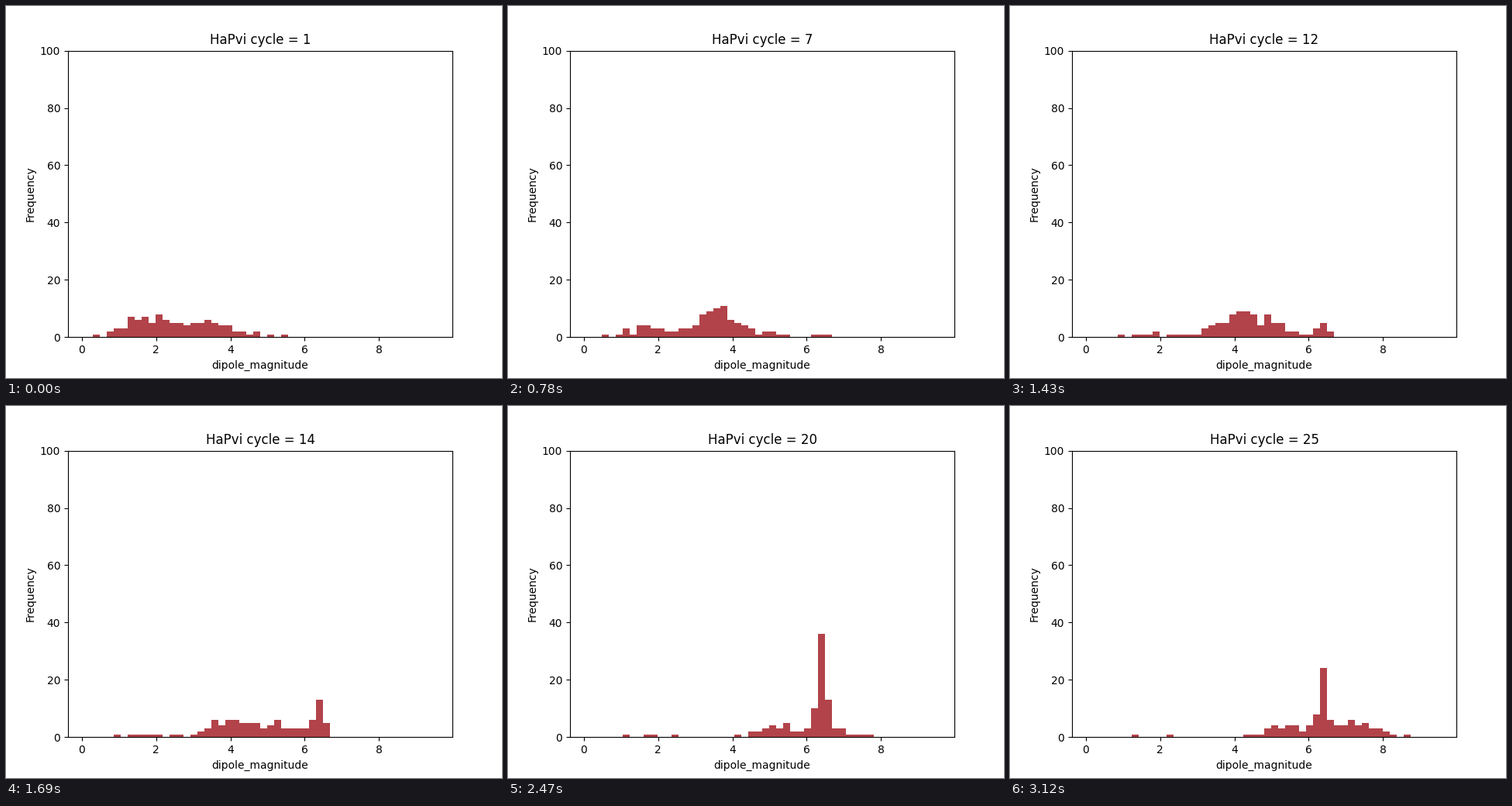
A matplotlib script for the animation above (3.25 s loop, 640x480 px).

```python
import numpy as np
import matplotlib.pyplot as plt
from matplotlib.animation import FuncAnimation

CYCLES = 25
BINS = 50
SAMPLES = 100
LOW, HIGH = 0.095, 9.51
RED = "#b2434a"

plt.rcParams["font.family"] = "DejaVu Sans"
edges = np.linspace(LOW, HIGH, BINS + 1)
centers = (edges[:-1] + edges[1:]) / 2


def glide(cycle, points):
    """Straight-line motion through a few {cycle: value} key points."""
    return np.interp(cycle, list(points), list(points.values()))


def bell(center, width):
    shape = np.exp(-0.5 * ((centers - center) / width) ** 2)
    return shape / shape.sum()


def histogram(cycle):
    """The population leaves a low group, climbs, and gathers in a spike."""
    low = glide(cycle, {1: 56, 4: 50, 9: 12, 16: 6, 25: 2})
    middle = glide(cycle, {1: 38, 4: 38, 9: 70, 12: 36, 16: 35, 20: 24, 25: 28})
    spike = glide(cycle, {4: 0, 9: 5, 12: 11, 16: 26, 20: 50, 25: 28})
    high = SAMPLES - low - middle - spike

    middle_at = glide(cycle, {1: 3.4, 9: 3.7, 16: 4.0, 20: 5.2, 25: 5.4})
    high_at = glide(cycle, {1: 4.6, 12: 4.8, 20: 6.6, 25: 7.2})

    density = (low * bell(1.8, 0.6) + middle * bell(middle_at, 0.5)
               + spike * bell(6.4, 0.12) + high * bell(high_at, 0.6))
    density *= np.random.default_rng(cycle).uniform(0.7, 1.3, BINS)
    running = np.cumsum(density) * SAMPLES / density.sum()
    # rounding the running sum gives whole counts with a fixed total
    return np.diff(np.rint(running), prepend=0)


fig, ax = plt.subplots(figsize=(6.4, 4.8), dpi=100)
bars = ax.bar(edges[:-1], histogram(1), width=np.diff(edges), align="edge",
              color=RED)
margin = 0.05 * (HIGH - LOW)
ax.set_xlim(LOW - margin, HIGH + margin)
ax.set_ylim(0, 100)
ax.set_xticks(range(0, 9, 2))
ax.set_yticks(range(0, 101, 20))
ax.set_xlabel("dipole_magnitude")
ax.set_ylabel("Frequency")
title = ax.set_title("")


def draw(frame):
    cycle = frame + 1
    for bar, count in zip(bars, histogram(cycle)):
        bar.set_height(count)
    title.set_text(f"HaPvi cycle = {cycle}")
    return [*bars, title]


anim = FuncAnimation(fig, draw, frames=CYCLES, interval=130, repeat=True,
                     repeat_delay=0, blit=False)
plt.show()
```
